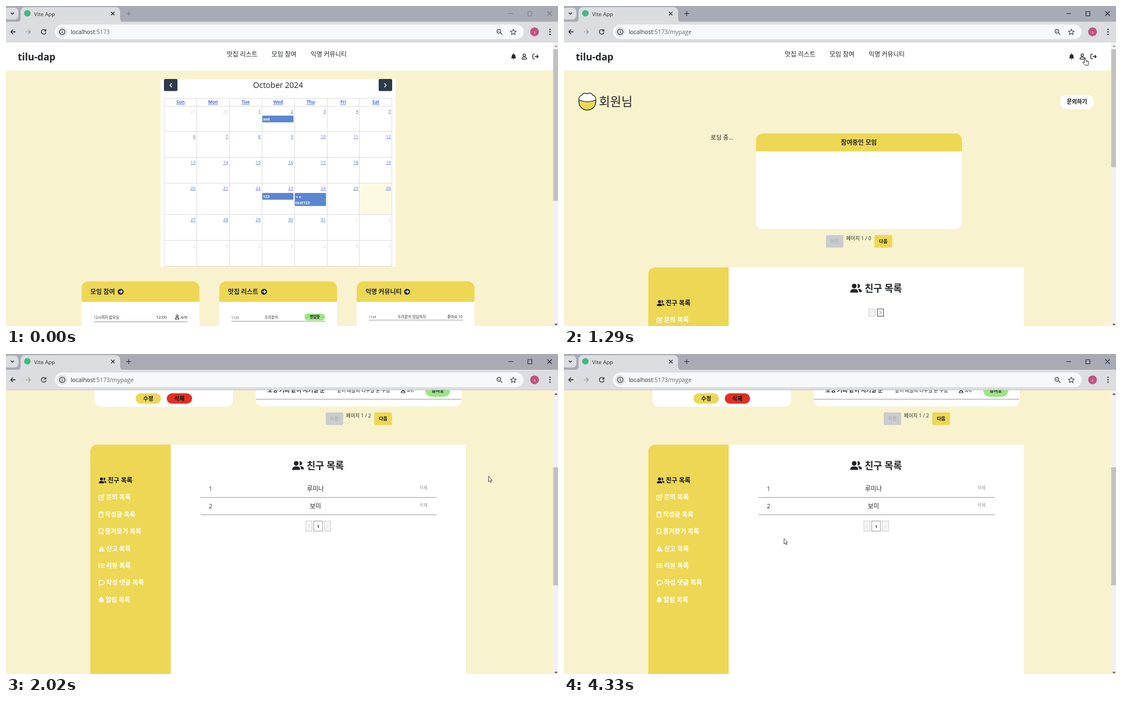
Animation of 982x570 px, one loop 4830 ms. Source, as an HTML page:

```html
<!DOCTYPE html>
<html lang="ko">
<head>
<meta charset="utf-8">
<title>Vite App</title>
<style>
html, body { margin: 0; width: 100%; height: 100%; overflow: hidden; background: #f9f2ce; }
svg { display: block; }
text { font-family: "Open Sans", "Noto Sans CJK KR", sans-serif; white-space: pre; }
.b { font-weight: 700; }
.m { text-anchor: middle; }
.e { text-anchor: end; }
.u { text-decoration: underline; }
</style>
</head>
<body>
<svg id="stage" width="982" height="570" viewBox="0 0 982 570"></svg>
<script>
const INK = '#212529', YELLOW = '#edd755', GREEN = '#98e680', CREAM = '#f9f2ce', LINK = '#4d70e3', RULE = '#9a9a9a';

const text = (x, y, s, size, cls = '', fill = INK) =>
  `<text x="${x}" y="${y}" font-size="${size}" class="${cls}" fill="${fill}">${s}</text>`;
const rect = (x, y, w, h, fill, r = 0, extra = '') =>
  `<rect x="${x}" y="${y}" width="${w}" height="${h}" rx="${r}" fill="${fill}" ${extra}/>`;
const disc = (x, y, r, fill, extra = '') => `<circle cx="${x}" cy="${y}" r="${r}" fill="${fill}" ${extra}/>`;
const path = (d, fill, stroke = 'none', w = 1) =>
  `<path d="${d}" fill="${fill}" stroke="${stroke}" stroke-width="${w}" stroke-linejoin="round"/>`;
const line = (d, stroke, w = 1) => path(d, 'none', stroke, w);
const group = (id, body) => `<g id="${id}">${body}</g>`;
// Box with round top corners
const cap = (x, y, w, h, r, fill) =>
  path(`M${x} ${y + h}v${r - h}a${r} ${r} 0 0 1 ${r} ${-r}h${w - 2 * r}a${r} ${r} 0 0 1 ${r} ${r}v${h - r}z`, fill);
const ring = (x, y, r) => `M${x - r} ${y}a${r} ${r} 0 1 0 ${2 * r} 0a${r} ${r} 0 1 0 ${-2 * r} 0z`;

// Icons on a 16 unit box around the origin: [filled part, outlined part]
const ICONS = {
  bell: ['M-7 5Q-5 3-5-1C-5-5-2-6-1-6V-8H1V-6C2-6 5-5 5-1Q5 3 7 5ZM-2 6H2Q2 8 0 8T-2 6Z', ''],
  user: ['', ring(0, -3.8, 3.3) + 'M-6 7Q-6 1.6-2 1.6H2Q6 1.6 6 7Z'],
  exit: ['', 'M-2-6H-5Q-7-6-7-4V4Q-7 6-5 6H-2M-2 0H7M3-4L7 0 3 4'],
  users: [ring(-2.8, -3.2, 3.6) + 'M-9 7Q-9 1.6-4 1.6H-1.6Q3.4 1.6 3.4 7ZM2.2-6.4A3.2 3.2 0 1 1 2.2-.2Q3.4-3.2 2.2-6.4ZM3 1.4H5Q9 1.6 9 6H5Q5 3 3 1.4Z', ''],
  smile: ['M-3.6-2h2v2h-2zM1.6-2h2v2h-2z', ring(0, 0, 7) + 'M-3.4 2.4Q0 5.4 3.4 2.4'],
  map: ['', 'M-8-4L-3-6 3-4 8-6V4L3 6-3 4-8 6ZM-3-6V4M3-4V6'],
  phone: ['M-4 4H4V7H-4Z', 'M-3.4-7H3.4Q4.4-7 4.4-6V6Q4.4 7 3.4 7H-3.4Q-4.4 7-4.4 6V-6Q-4.4-7-3.4-7Z'],
  edit: ['', 'M0-5H-5Q-7-5-7-3V5Q-7 7-5 7H3Q5 7 5 5V1M-2 2L-1-2 5-7 7-5 2 1Z'],
  clip: ['M-3-8H3V-3H-3Z', 'M-5-6H5V7H-5Z'],
  mark: ['', 'M-5-7H5V7L0 3-5 7Z'],
  warn: ['M0-7L8 7H-8ZM-1-2V3H1V-2ZM-1 4V6H1V4Z', ''],
  list: ['M-8-6h3v3h-3zM-8-1.5h3v3h-3zM-8 3h3v3h-3z', 'M-3-4.5H8M-3 0H8M-3 4.5H8'],
  talk: ['', 'M-6 7Q-5 5-5.5 3.5C-10-1-5-6 0-6S8-3 8 0-1 7-3 5.4Q-4 7-6 7Z']
};
const icon = (name, x, y, size, color = INK) => {
  const [solid, outline] = ICONS[name];
  return `<g transform="translate(${x} ${y}) scale(${size / 16})" fill-rule="evenodd">` +
    path(solid, color) + line(outline, color, 1.9) + '</g>';
};
const goIcon = (x, y) => disc(x, y, 5.3, INK) + line(`M${x - 3} ${y}h5.6m-2.6-2.7l2.7 2.7-2.7 2.7`, '#fff', 1.3);
const pill = (x, y, w, h, label, size, fill, r = h / 2) =>
  rect(x, y, w, h, fill, r) + text(x + w / 2, y + h / 2 + size * .36, label, size, 'b m', '#111');

function siteHeader() {
  return rect(0, 64, 973, 51, '#fff') + text(21, 97, 'tilu-dap', 17.2, 'b') +
    text(420, 90, '맛집 리스트', 11.2, 'm') + text(494.5, 90, '모임 참여', 11.3, 'm') +
    text(574, 90, '익명 커뮤니티', 11.1, 'm') +
    icon('bell', 903, 90, 10.5) + icon('user', 922, 90, 10.5) + icon('exit', 942, 90, 11);
}

function calendar() {
  const left = 281.5, step = 57.9, tops = [178.5, 223.5, 269.5, 315.5, 371.5, 417.5, 463.5];
  let s = rect(275, 130, 418, 334, '#fff') + text(484, 146, 'October 2024', 14, 'm');
  [[281, 1], [663, -1]].forEach(([x, dir]) => {
    s += rect(x, 130, 24, 21.5, '#2c3a4a', 2) + line(`M${x + 12 + 2 * dir} 137.5l${-3.6 * dir} 3.6 ${3.6 * dir} 3.6`, '#fff', 1.3);
  });
  s += rect(left + 6 * step, 315.5, step, 56, '#fdfae4');
  ['Sun', 'Mon', 'Tue', 'Wed', 'Thu', 'Fri', 'Sat'].forEach((d, i) => {
    s += text(left + (i + .5) * step, 174, d, 8, 'b m u', LINK);
  });
  for (let i = 0; i < 42; i++) {
    const day = i < 2 ? 29 + i : i < 33 ? i - 1 : i - 32;
    s += text(left + (i % 7 + 1) * step - 2, tops[i / 7 | 0] + 11.5, day, 8, 'e u', i < 2 || i > 32 ? '#c9def6' : LINK);
  }
  [164, ...tops].forEach(y => s += line(`M281 ${Math.floor(y) + .5}H687`, '#ddd'));
  for (let i = 0; i < 8; i++) s += line(`M${Math.floor(left + i * step) + .5} 164V463.5`, '#ddd');
  const event = (x, y, label, size = 7) => rect(x, y, 55.5, 12, '#5b86d0', 1.5) + text(x + 1, y + 8.6, label, size, 'b', '#fff');
  return s + event(456, 195.3, 'asd') + event(456, 333, '123') + event(513.8, 333, 'ㅋ ㅌ', 5) + event(513.8, 344.3, 'test123');
}

function homeCards() {
  const card = (x, title, arrow, ruleY) =>
    cap(x, 490.5, 209.5, 37, 12, YELLOW) + rect(x, 527, 209.5, 50, '#fff') +
    text(x + 15.5, 512.5, title, 11.1, 'b') + goIcon(arrow, 509) + line(`M${x + 21.5} ${ruleY}h167`, RULE);
  return card(134.5, '모임 참여', 204, 562.5) + text(156, 556.5, '12시까지 밥모임', 6.5) + text(267, 557, '12:00', 7.5) +
    icon('user', 304.5, 554, 8.5) + text(310.5, 557, '4/6', 8) +
    card(379.5, '맛집 리스트', 459, 561.5) + text(401, 556.5, '1123', 5.8) + text(460, 556.5, '두리분식', 6.5) +
    pill(531, 548, 36.5, 12, '영업중', 6.6, GREEN) +
    card(624, '익명 커뮤니티', 713.5, 559.5) + text(645, 555.5, '1123', 5.8) +
    text(697, 555.5, '두리분식 맛있어라', 6.55) + text(785, 555.5, '좋아요 10', 6.5);
}

function bowl() {
  return path('M27 169C25 163 29 159 32 159C33 155 38 154.5 41 156.5C45 154 50 155 51 159C55 159 58 164 56 169L41.5 174Z', '#fff', '#111', 1.1) +
    path('M26.5 167.5Q41.5 174 56.5 167.5C57.5 179 50 185.4 41.5 185.4S25.5 179 26.5 167.5Z', YELLOW, '#111', 1.2);
}

function infoCard() {
  const row = (y, name, label, size) => icon(name, 189, y, 13) + text(207, y + 5, label, size);
  return rect(157.5, 227, 246.5, 171, '#fff', 12) + cap(157.5, 227, 246.5, 32, 12, '#e16a64') +
    text(280.5, 246.5, '회원정보', 10.9, 'b m') +
    row(271, 'smile', '고구마2', 10.8) + row(298.5, 'map', '견과류 과정 1기', 11) +
    row(326, 'phone', '010-0000-0000', 10.1) + row(353.5, 'users', '23', 10.1) +
    pill(230.5, 374, 45, 18.5, '수정', 9.8, YELLOW) + pill(286, 374, 45, 18.5, '삭제', 9.8, '#e03024');
}

function meetingCard() {
  return rect(341.5, 227, 366.5, 170.5, '#fff', 12) + cap(341.5, 227, 366.5, 32, 12, YELLOW) +
    text(524.5, 246.5, '참여중인 모임', 11.1, 'b m') +
    rect(466, 408, 31, 22.5, '#cbcccd', 2) + text(481.5, 422, '이전', 8.4, 'm', '#a2a3a4') +
    pill(552.3, 408, 31.5, 22.5, '다음', 8.4, YELLOW, 2);
}

function meetings() {
  const row = (y, name, x, note, noteX, iconX) =>
    text(x, y + 3.4, name, 10, 'b') + text(noteX, y + 3, note, 8.45) + icon('user', iconX, y + .5, 9) +
    text(iconX + 6.5, y + 3.4, '4/6', 8) + pill(iconX + 62.5 - (iconX > 700 ? 23.2 : 0), y - 11, 44.5, 22.5, '참여중', 7.9, GREEN) +
    line(`M444.5 ${Math.floor(y) + 16.5}H810`, RULE);
  return row(282, '육비 먹자', 489, '맛있는 육비', 572, 659.5) +
    row(325.3, '피자ㄱ?', 489, '피자 나눠먹자', 564, 659.5) +
    row(368.5, '모닝 커피 같이 시키실 분', 465, '같이 배달비 나누실 분 구함', 589, 706.5);
}

const MENU = [['users', 181, '친구 목록'], ['edit', 178, '문의 목록'], ['clip', 176, '작성글 목록'], ['mark', 176, '즐겨찾기 목록'],
  ['warn', 178, '신고 목록'], ['list', 178, '리뷰 목록'], ['talk', 178, '작성 댓글 목록'], ['bell', 177, '알림 목록']];

function friendPanel() {
  let s = rect(293, 465.5, 525, 500, '#fff') + path('M150 965V477.5a12 12 0 0 1 12-12H293V965z', YELLOW);
  MENU.forEach(([name, x, label], i) => {
    const y = 529 + i * 30.4, color = i ? '#fff' : '#111';
    s += icon(name, (164 + x) / 2 - (i ? 1 : .5), y, i ? 11 : 12, color) + text(x, y + 4, label, 11.2, 'b', color);
  });
  return s + icon('users', 519.5, 502.5, 18.5) + text(535, 508.5, '친구 목록', 16.8, 'b');
}

function pageBox(x, y, w, h, dir, color) {
  return rect(x + .5, y + .5, w - 1, h - 1, '#f6f6f6', 0, `stroke="${color}"`) +
    line(`M${x + w / 2 - 1.5 * dir} ${y + h / 2 - 3}l${3 * dir} 3 ${-3 * dir} 3`, color, .8);
}

function friends() {
  let s = '';
  ['루미나', '보미'].forEach((name, i) => {
    const y = 544 + i * 31;
    s += text(361, y + 4, i + 1, 10) + text(550.5, y + 4, name, 10.9, 'm') +
      text(735, y + 1, '삭제', 8.2, '', '#9b9b9b') + line(`M346 ${559.5 + i * 31}H766`, RULE);
  });
  return s + pageBox(533, 601, 12, 19, -1, '#ccc') + pageBox(566, 601, 12, 19, 1, '#ccc') +
    rect(547.5, 601.5, 15.5, 18, '#fff', 0, 'stroke="#999"') + text(555.3, 613.5, '1', 7.5, 'b m');
}

function browser() {
  const bar = '#dcdde1', dark = '#25272a';
  return rect(0, 0, 982, 29, '#a8abb4') + rect(-3, 3, 25, 21, bar, 7) + line('M8.5 12l2.7 2.7 2.7-2.7', dark, 1.3) +
    cap(26, 2, 177, 27, 8, bar) + path('M19 29q7 0 7-7v7zM210 29q-7 0-7-7v7z', bar) + rect(0, 28, 982, 36, bar) + rect(0, 63.5, 982, 1, '#c6c8cc') +
    disc(38, 13, 5.8, '#41b883') + text(50, 18, 'Vite App', 9.6, '', '#333') + line('M187 10.5l6 6m0-6l-6 6', dark, 1.2) +
    group('win', '<path d="M214 13.5h8.5M218.3 9.3v8.5M893.5 13.5h8.5M928.5 10h7v7.5h-7zM963 9.5l8 8m0-8l-8 8" fill="none"/>') +
    line('M17 46H8.5m4-4l-4 4 4 4', dark, 1.3) + line('M35 46h8.5m-4-4l4 4-4 4', '#96999e', 1.2) +
    line('M70.5 43.5A4.2 4.2 0 1 0 71.2 47', dark, 1.3) + path('M71.7 41v4.3h-4.3z', dark) +
    rect(87, 33, 834, 26, '#f6f8fa', 13) + disc(100, 46, 9, '#e0e2e6') + disc(100, 46, 4.8, 'none', `stroke="${dark}" stroke-width="1.1"`) +
    line('M100 45.3v3.2M100 43v1.2', dark, 1.1) +
    '<text x="115" y="50" font-size="10.35" fill="#333">localhost<tspan fill="#666">:5173<tspan id="route"></tspan></tspan></text>' +
    disc(876.8, 45, 3.3, 'none', 'stroke="#444" stroke-width="1.2"') + line('M879.3 47.5l3.7 3.7M875.3 45h3', '#444', 1.2) +
    line('M902.5 41.2l1.5 3.4 3.7.3-2.8 2.5.9 3.6-3.3-1.9-3.3 1.9.9-3.6-2.8-2.5 3.7-.3z', '#444', 1.1) +
    disc(940.3, 46, 7.8, '#c0527f') + text(940.3, 48.7, 's', 8, 'm', '#f6e3ec') +
    [41.5, 46, 50.5].map(y => disc(967.8, y, 1.2, dark)).join('');
}

function scrollbar() {
  return rect(973, 64.5, 9, 506, '#f1f1f1') + '<path id="up" d="M975.5 73l3-3.5 3 3.5z"/>' +
    path('M975.5 566l3 3.2 3-3.2z', '#505050') + '<rect id="thumb" x="973.5" y="77" width="8.5" fill="#c1c1c1"/>';
}

const $ = id => document.getElementById(id);
const set = (id, attrs) => { for (const k in attrs) $(id).setAttribute(k, attrs[k]); };
const show = (id, on) => set(id, { visibility: on ? 'visible' : 'hidden' });

$('stage').innerHTML = rect(0, 64, 982, 506, CREAM) +
  group('page', siteHeader() +
    group('home', calendar() + homeCards()) +
    group('my', bowl() + '<text id="hello" x="62" y="178" font-size="21.8" fill="#212529"></text>' +
      pill(883, 158, 59, 25.5, '문의하기', 9.8, '#fff', 10) +
      group('joined', meetingCard() + '<text id="pages" x="502" y="417" font-size="8.8" fill="#212529"></text>') + friendPanel()) +
    group('loading', text(261, 238, '로딩 중...', 10.5) + pageBox(542, 539, 12, 14, -1, '#ccc') + pageBox(557, 539, 12, 14, 1, '#555')) +
    group('loaded', infoCard() + meetings() + friends())) +
  scrollbar() + browser() +
  group('halo', disc(926, 93.5, 9.3, '#f7ee20', 'fill-opacity=".72"')) +
  group('arrow', path('M.4.6V10.6L2.7 8.5 4.2 11.9 5.7 11.2 4.2 8H7Z', '#fff', '#222', .8)) +
  group('hand', path('M4 1.3Q5.1 0 6.2 1.3V5L10.4 6.1Q12 6.7 11.6 8.6L10.6 13.5H5L1 8.9Q.6 7.4 2 7.5L4 9Z', '#fff', '#222', .9) +
    line('M7.7 6v2M9.4 6.4v1.8', '#222', .7));

// Pointer path: [tick, x, y]
const PATH = [[1, 947, 555], [4, 899, 270], [6, 908, 138], [9, 921, 93], [10, 922, 92], [14, 922, 92], [18, 858, 217],
  [23, 858, 217], [26, 670, 245], [29, 513, 230], [31, 596, 222], [34, 357, 330], [35, 375, 352], [38, 851, 154],
  [41, 365, 244], [43, 391, 328], [49, 391, 328]];

function pointer(tick) {
  const i = Math.max(1, PATH.findIndex(p => p[0] >= tick));
  const [a, b] = [PATH[i - 1], PATH[i]], k = (tick - a[0]) / (b[0] - a[0]);
  return [1, 2].map(j => a[j] + (b[j] - a[j]) * k);
}

function draw(t) {
  const my = t >= 1290, loaded = t >= 1400, scroll = t < 1910 ? 0 : t < 2020 ? 99 : 304;
  show('home', !my);
  show('my', my);
  show('loading', my && !loaded);
  show('loaded', loaded);
  $('route').textContent = my ? '/mypage' : '';
  $('hello').textContent = loaded ? '고구마2 회원님' : '회원님';
  $('pages').textContent = loaded ? '페이지 1 / 2' : '페이지 1 / 0';
  set('joined', { transform: `translate(${loaded ? 102.8 : 0} 0)` });
  set('page', { transform: `translate(0 ${-scroll})` });
  set('thumb', { y: 77 + scroll * .411, height: my ? 210 : 270 });
  set('up', { fill: scroll ? '#505050' : '#a3a3a3' });
  set('win', { stroke: t < 1190 ? '#7c7f87' : '#25272a', 'stroke-width': 1.1 });

  // The pointer is sampled about ten times a second
  const tick = Math.floor((t + 20) / 100.7), hand = tick >= 9 && tick <= 14;
  const [x, y] = pointer(tick), transform = `translate(${x} ${y})`;
  set('arrow', { transform });
  set('hand', { transform });
  show('arrow', tick >= 1 && !hand);
  show('hand', hand);
  show('halo', t >= 1190 && t < 1290);
}

const start = performance.now();
function loop() {
  draw((performance.now() - start) % 4830);
  requestAnimationFrame(loop);
}
loop();
</script>
</body>
</html>
```
